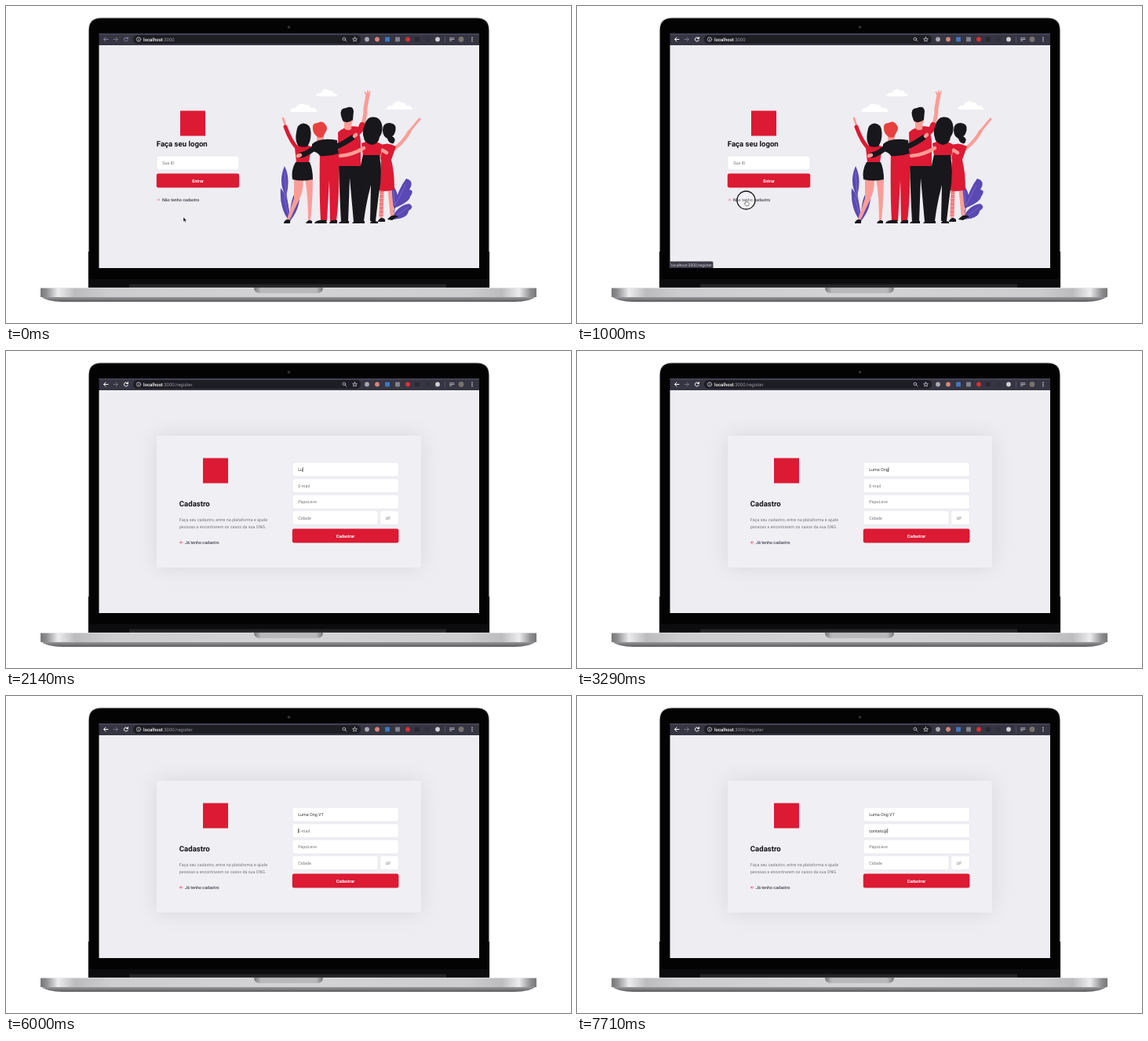
Recreate the animation shown at these times as an HTML page. Size 720 by 404 pixels, loop 8 s.

```html
<!DOCTYPE html>
<html lang="pt">
<head>
<meta charset="utf-8">
<title>Cadastro</title>
<style>
html, body { margin: 0; width: 100%; height: 100%; overflow: hidden; background: #fff; }
svg { display: block; width: 100vw; height: 100vh; }
text { font: 400 5.4px Roboto, Arial, sans-serif; text-rendering: geometricPrecision; white-space: pre; fill: #77767e; }
text.title { font-size: 9.6px; font-weight: 700; fill: #131319; }
text.link { font-weight: 500; fill: #41414d; }
text.button { font-weight: 700; fill: #fff; text-anchor: middle; }
text.url { font-size: 6px; fill: #9a99a3; }
text.url .host { fill: #fff; font-weight: 500; }
text.tip { font-size: 5px; fill: #d5d4dc; }
.box { fill: #fff; stroke: #dcdce6; stroke-width: .5; }
.red { fill: #dc1a33; }
.black { fill: #17171c; }
.skin { fill: #fb9d97; }
.leaf { fill: #5a49b3; }
.white { fill: #fff; }
.line { fill: none; stroke-linecap: round; stroke-linejoin: round; }
.line.red { stroke: #dc1a33; }
.line.black { stroke: #17171c; }
.line.skin { stroke: #fb9d97; }
</style>
</head>
<body>
<svg viewBox="0 0 720 404">
  <defs>
    <linearGradient id="metal">
      <stop offset="0" stop-color="#77777a"/><stop offset=".012" stop-color="#8f8f92"/>
      <stop offset=".035" stop-color="#ececee"/><stop offset=".07" stop-color="#bcbcbf"/>
      <stop offset=".14" stop-color="#cdcdd0"/><stop offset=".5" stop-color="#d3d3d6"/>
      <stop offset=".86" stop-color="#cdcdd0"/><stop offset=".93" stop-color="#bcbcbf"/>
      <stop offset=".965" stop-color="#ececee"/><stop offset=".988" stop-color="#8f8f92"/>
      <stop offset="1" stop-color="#77777a"/>
    </linearGradient>
    <linearGradient id="under" x2="0" y2="1">
      <stop offset="0" stop-color="#a2a2a5"/><stop offset="1" stop-color="#5c5c60"/>
    </linearGradient>
    <linearGradient id="notch">
      <stop offset="0" stop-color="#77777a"/><stop offset=".1" stop-color="#b9b9bc"/>
      <stop offset=".9" stop-color="#b9b9bc"/><stop offset="1" stop-color="#77777a"/>
    </linearGradient>
    <filter id="blur" x="-30%" y="-50%" width="160%" height="200%"><feGaussianBlur stdDeviation="14"/></filter>
    <clipPath id="page"><rect x="118.5" y="50" width="484.5" height="284"/></clipPath>
  </defs>

  <!-- laptop -->
  <path d="M104.500 359V31Q104.500 14.500 121 14.500H600Q616.500 14.500 616.500 31V359Z" fill="#d6d6d9"/>
  <path d="M105 359V313H105.700V31Q105.700 15.600 121 15.600H600Q615.300 15.600 615.300 31V313H616V359Z" fill="#030304"/>
  <path d="M105 348H616V359H105Z" fill="#0c0c0e"/>
  <path d="M157 354.500H561V359H157Z" fill="#242427"/>
  <circle cx="360.500" cy="27" r="2" fill="#23232a"/>
  <circle cx="360.500" cy="27" r=".8" fill="#4a4a58"/>
  <path d="M44 370H676Q668 377 648 377H72Q52 377 44 370Z" fill="url(#under)"/>
  <path d="M44 359H676V371H44Z" fill="url(#metal)"/>
  <path d="M44 359.300H676" stroke="#ececee" stroke-width=".7"/>
  <path d="M316 359H404Q404 366 396 366H324Q316 366 316 359Z" fill="url(#notch)"/>

  <!-- browser bar -->
  <path d="M118.500 35H603V50H118.500Z" fill="#363542"/>
  <path d="M118.500 35H603V36.500H118.500Z" fill="#4a485c"/>
  <rect x="162" y="37" width="290" height="11" rx="5.500" fill="#1d1d24"/>
  <g class="line" stroke-width="1" id="nav">
    <path d="M130 42.500H124.500M127 40L124.500 42.500L127 45M155 41A2.500 2.500 0 1 0 155.300 43.500M155.500 39.800V41.600H153.500"/>
  </g>
  <path class="line" stroke="#777584" d="M137 42.500H142.500M140 40L142.500 42.500L140 45"/>
  <g class="line" stroke="#dddce4" stroke-width=".7">
    <circle cx="169" cy="42.500" r="2.700"/><path d="M169 42.300V44M169 41V41.100"/>
    <circle cx="430.800" cy="42" r="1.800"/><path d="M432.200 43.400L434 45.200"/>
    <path d="M444.500 39.700L445.300 41.700L447.400 41.800L445.800 43.200L446.300 45.200L444.500 44.100L442.700 45.200L443.200 43.200L441.600 41.800L443.700 41.700Z"/>
    <path d="M565.500 40.800H571M565.500 42.500H571M565.500 44.200H568"/>
    <path d="M559.500 39V46" stroke="#65637a"/>
  </g>
  <text class="url" x="175" y="44.700"><tspan class="host">localhost</tspan>:3000<tspan id="path"></tspan></text>
  <g id="extensions"></g>
  <circle cx="580" cy="42.500" r="3.400" fill="#77736c"/>
  <g class="white"><circle cx="594" cy="40.300" r=".7"/><circle cx="594" cy="42.500" r=".7"/><circle cx="594" cy="44.700" r=".7"/></g>

  <path d="M118.500 50H603V334H118.500Z" fill="#eeedf2"/>

  <g id="login">
    <rect class="red" x="222" y="133.500" width="32" height="32"/>
    <text class="title" x="191.800" y="179">Faça seu logon</text>
    <rect class="box" x="192" y="191.200" width="105" height="17.500" rx="2.400"/>
    <text x="199.200" y="202">Sua ID</text>
    <rect class="red" x="191.800" y="213.400" width="105.400" height="18.200" rx="2.400"/>
    <text class="button" x="244.500" y="224.500">Entrar</text>
    <path class="line" stroke="#e02041" stroke-width=".5" opacity=".7" d="M192.500 247H195.600M194.500 245.800L195.700 247L194.500 248.200"/>
    <text class="link" x="199" y="248.900">Não tenho cadastro</text>

    <g class="white">
      <path d="M362 135Q363 129 369 130Q374 122 382 126Q387 125 388 130Q395 129 397 135Z"/>
      <path d="M395 115Q396 110 401 111Q406 103 412 108Q417 107 417 111Q421 111 422 115Z"/>
      <path d="M485 132Q486 126 492 127Q498 118 505 123Q510 123 510 127Q517 126 518 132Z"/>
    </g>
    <g class="leaf">
      <path d="M357 243Q346 225 355 204Q363 220 357 243ZM361 274Q348 258 350 232Q362 246 361 274ZM362 274Q361 243 373 232Q378 254 362 274Z"/>
      <path d="M494 258Q499 234 510 220Q521 223 514 234Q521 235 515 243Q514 250 494 258ZM490 272Q500 253 514 252Q521 256 513 261Q512 272 490 272ZM495 258Q484 242 494 230Q504 244 495 258Z"/>
    </g>
    <path class="line leaf" stroke="#5a49b3" stroke-width="1" d="M357 240Q360 258 362 274M490 272Q495 264 496 254"/>
    <path class="line" stroke="#9589dc" stroke-width=".5" d="M357 239L355 212M361 270L354 243M363 270Q370 254 371 239M496 254L509 228M494 270L512 257M495 254L494 236"/>

    <!-- first woman -->
    <path class="line skin" stroke-width="2.500" d="M356 152L353 143"/>
    <path class="line red" stroke-width="5" d="M373 183Q363 174 356 154"/>
    <path class="skin" d="M367 220H379Q379 236 374 246L361 273L358 272L367 245ZM381 220H391Q391 246 388 273H385Q385 242 381 220Z"/>
    <path class="black" d="M354 276Q357 270 362 273V277H354ZM382 277Q385 271 390 274V277Z"/>
    <path class="red" d="M368 181Q379 172 389 180L386 199Q379 202 370 199Z"/>
    <path class="black" d="M369 199Q363 209 365 221Q378 224 391 221Q391 208 387 199Z"/>
    <path class="black" d="M379 149.500Q388 150 388.500 161Q389 172 384 179Q377 181 372 178Q368 171 370 161Q371 150 379 149.500Z"/>
    <!-- red-haired friend -->
    <path class="skin" d="M396 158H405V172H396Z"/>
    <path d="M391 156Q390 149 397 149Q403 145 407 151Q411 156 407 161L404 167Q399 169 396 166Q391 162 391 156Z" fill="#e8403f"/>
    <path class="red" d="M400 184H424L424 208Q425 242 421 274H413L412 222L409 274H401Q399 240 400 184Z"/>
    <path class="black" d="M393 277Q395 272 408 273L409 277ZM412 277Q413 272 422 273V277Z"/>
    <path class="black" d="M390 176Q400 167 422 171L424 188Q412 192 400 191Q397 186 390 185Z"/>
    <!-- tall man -->
    <path class="line skin" stroke-width="5" d="M452 156Q458 146 458 130L461 113"/>
    <path class="line skin" stroke-width="1.700" d="M460 114L457.500 110M461 113L461 108M462 114L464 109"/>
    <path class="black" d="M424 202H452Q455 240 452 275H443L438 219L436 275H427Q425 240 424 202ZM424 277Q426 272 437 274V277ZM441 277Q444 272 454 274V277Z"/>
    <path class="line red" stroke-width="8" d="M445 163Q452 159 454 152"/>
    <path class="red" d="M423 161Q434 151 449 154L452 172L452 204H424Z"/>
    <path class="skin" d="M429 140H442V147Q440 150 440 157Q435 160 431 156V149Q428 147 429 140Z"/>
    <path class="black" d="M427 140Q425 130 433 130Q442 126 443 134L442 145Q435 151 429 146Z"/>
    <!-- fifth friend -->
    <path class="line skin" stroke-width="4.500" d="M495 182Q507 173 514 160"/>
    <path class="line skin" stroke-width="3" d="M513 161L527 144"/>
    <path class="line skin" stroke-width="5" d="M479 234L478 268M489 234L492 266"/>
    <path class="line red" stroke-width="5" stroke-dasharray=".5 2" style="stroke-linecap:butt" d="M479 236L478 268"/>
    <path class="black" d="M474 274Q478 267 483 272V275H474ZM486 272Q492 264 500 268L492 273Z"/>
    <path class="red" d="M474 179Q485 172 497 179L491 196Q495 212 495 234Q483 238 472 234Q477 212 478 197Z"/>
    <path class="black" d="M480 158Q480 149 489 149Q498 150 496.500 158Q495 165 492 166Q498 169 494 175Q488 176 486 169Q480 166 480 158Z"/>
    <!-- fourth friend -->
    <path class="skin" d="M453 181H480L477 195H455Z"/>
    <path class="red" d="M453 175Q466 168 480 177L477 191Q465 193 455 190Z"/>
    <path class="black" d="M455 190H476Q480 215 475 240L471 274H464L465 228Q459 250 456 274H448Q453 240 451 218Q451 203 455 190ZM444 277Q447 271 457 274V277ZM464 277Q465 271 474 275V277Z"/>
    <path class="black" d="M467 141.500Q478 141 479.500 154Q480 162 476 167Q475 176 466 177Q456 174 456 168Q453 160 457 152Q459 142 467 141.500Z"/>
    <!-- embracing arms -->
    <path class="line black" stroke-width="7" d="M394 179Q386 188 376 190M405 185Q424 180 441 168"/>
    <path class="line skin" stroke-width="4.500" d="M372 191L375 190M444 166L446 164M456 181Q441 190 426 191M480 184L485 187"/>
  </g>

  <g id="register">
    <g clip-path="url(#page)"><rect x="192" y="108" width="337" height="168" opacity=".09" filter="url(#blur)"/></g>
    <rect x="192" y="108" width="337" height="168" rx="2.400" fill="#f0eff4"/>
    <rect class="red" x="251" y="136.500" width="32" height="32"/>
    <text class="title" x="220.800" y="198">Cadastro</text>
    <text x="220.800" y="216.600">Faça seu cadastro, entre na plataforma e ajude</text>
    <text x="220.800" y="226.200">pessoas a encontrarem os casos da sua ONG.</text>
    <path class="line" stroke="#e02041" stroke-width=".6" d="M225 244H221.700M223.200 242.500L221.700 244L223.200 245.500"/>
    <text class="link" x="228" y="246">Já tenho cadastro</text>
    <g id="fields"></g>
    <rect class="red" x="364.800" y="226.400" width="135.600" height="18.200" rx="2.400"/>
    <text class="button" x="432.500" y="237.500">Cadastrar</text>
    <path id="caret" stroke="#222" stroke-width=".6" d="M0 -3V3"/>
  </g>

  <g id="tip">
    <path id="tipBox" fill="#3d3c48"/>
    <text class="tip" x="120" y="331.600"></text>
  </g>
  <circle id="ring" r="11.500" fill="#fff" fill-opacity=".3" stroke="#111" stroke-width="1.300"/>
  <path id="cursor" stroke="#fff" stroke-width=".5"/>
</svg>
<script>
const $ = id => document.getElementById(id);
const show = (el, on) => el.style.display = on ? '' : 'none';
const STEP = 1000 / 7, STEPS = 56;

const dots = [[460, '#a9a8ae'], [473, '#d9837c'], [486, '#3f78c4', 1], [499, '#85838e', 1],
  [512, '#dd2f35'], [524, '#292832', 1], [537, '#30303b'], [550, '#d0cfd4']];
$('extensions').innerHTML = dots.map(([x, color, square]) =>
  `<rect x="${x - 2.9}" y="39.600" width="5.800" height="5.800" rx="${square ? 0 : 2.9}" fill="${color}"/>`).join('');

const fields = [['Nome da ONG', 365, 142.2, 135.5], ['E-mail', 365, 162.8, 135.5],
  ['PapoLeve', 365, 183.2, 135.5], ['Cidade', 365, 203.7, 109], ['UF', 476.5, 203.7, 24]];
$('fields').innerHTML = fields.map(([label, x, y, w]) =>
  `<rect class="box" x="${x}" y="${y}" width="${w}" height="17.800" rx="2.400"/>` +
  `<text x="${x + 7.2}" y="${y + 10.9}">${label}</text>`).join('');
const labels = $('fields').querySelectorAll('text');

// Steps at which each character is typed
const entries = [
  ['Luma Ong VT', [14, 15, 17, 18, 20, 20, 21, 23, 25, 26, 29]],
  ['contato@', [44, 45, 46, 47, 49, 50, 51, 53]]
];

const shapes = {
  arrow: 'M0 0V6L1.400 4.800L2.400 7L3.400 6.500L2.500 4.500H4.300Z',
  hand: 'M-.6 0Q0 -.8 .6 0V2.400L3.200 3Q4 3.300 3.700 4.500L3 7H-.5L-2.500 4.200Q-2 3.200 -.6 4.200Z',
  beam: 'M-1.200 -3H1.200M0 -3V3M-1.200 3H1.200'
};
// step, x, y
const track = [[0, 226, 269], [1, 225.5, 268], [3, 221, 259], [5, 216, 248.5], [7, 215.5, 247.5],
  [8, 378, 193], [9, 391, 165], [10, 398, 152], [13, 398, 152]];

function locate(step) {
  const i = Math.max(1, track.findIndex(p => p[0] >= step));
  const [a, ax, ay] = track[i - 1], [b, bx, by] = track[i];
  const k = (step - a) / (b - a);
  return [ax + (bx - ax) * k, ay + (by - ay) * k];
}

function drawCursor(step) {
  show($('cursor'), step < 14);
  show($('ring'), step === 7 || step === 11);
  if (step >= 14) return;
  const [x, y] = locate(step);
  const kind = step >= 10 ? 'beam' : step >= 5 && step < 8 ? 'hand' : 'arrow';
  $('cursor').setAttribute('d', shapes[kind]);
  $('cursor').setAttribute('transform', `translate(${x} ${y})`);
  $('cursor').setAttribute('fill', kind === 'hand' ? '#fff' : '#111');
  $('cursor').setAttribute('stroke', kind === 'arrow' ? '#fff' : '#222');
  $('ring').setAttribute('cx', x);
  $('ring').setAttribute('cy', y);
}

function drawForm(step) {
  entries.forEach(([text, keys], i) => {
    const count = keys.filter(k => k <= step).length;
    labels[i].textContent = count ? text.slice(0, count) : fields[i][0];
    labels[i].style.fill = count ? '#333' : '';
  });
  const row = step < 35 ? 0 : 1;
  const typed = entries[row][1][0] <= step;
  const width = typed ? labels[row].getComputedTextLength() : 0;
  const hidden = step < 12 || step >= 31 && step < 33 || step >= 39 && step < 42;
  show($('caret'), !hidden);
  $('caret').setAttribute('transform', `translate(${372.5 + width} ${fields[row][2] + 8.9})`);
}

function drawTip(step) {
  const long = step < 8;
  show($('tip'), step >= 5 && step < 9);
  $('tip').lastElementChild.textContent = 'localhost:3000' + (long ? '/register' : '');
  $('tipBox').setAttribute('d', `M118.500 325.500H${long ? 172 : 154}q1.500 0 1.500 1.500V334H118.500Z`);
}

function frame(now) {
  const step = Math.floor((now % 8000 + 4) / STEP) % STEPS;
  const registering = step >= 8;
  show($('login'), !registering);
  show($('register'), registering);
  $('path').textContent = registering ? '/register' : '';
  $('nav').setAttribute('stroke', step ? '#fff' : '#8583a0');
  drawTip(step);
  drawCursor(step);
  if (registering) drawForm(step);
  requestAnimationFrame(frame);
}
requestAnimationFrame(frame);
</script>
</body>
</html>
```
